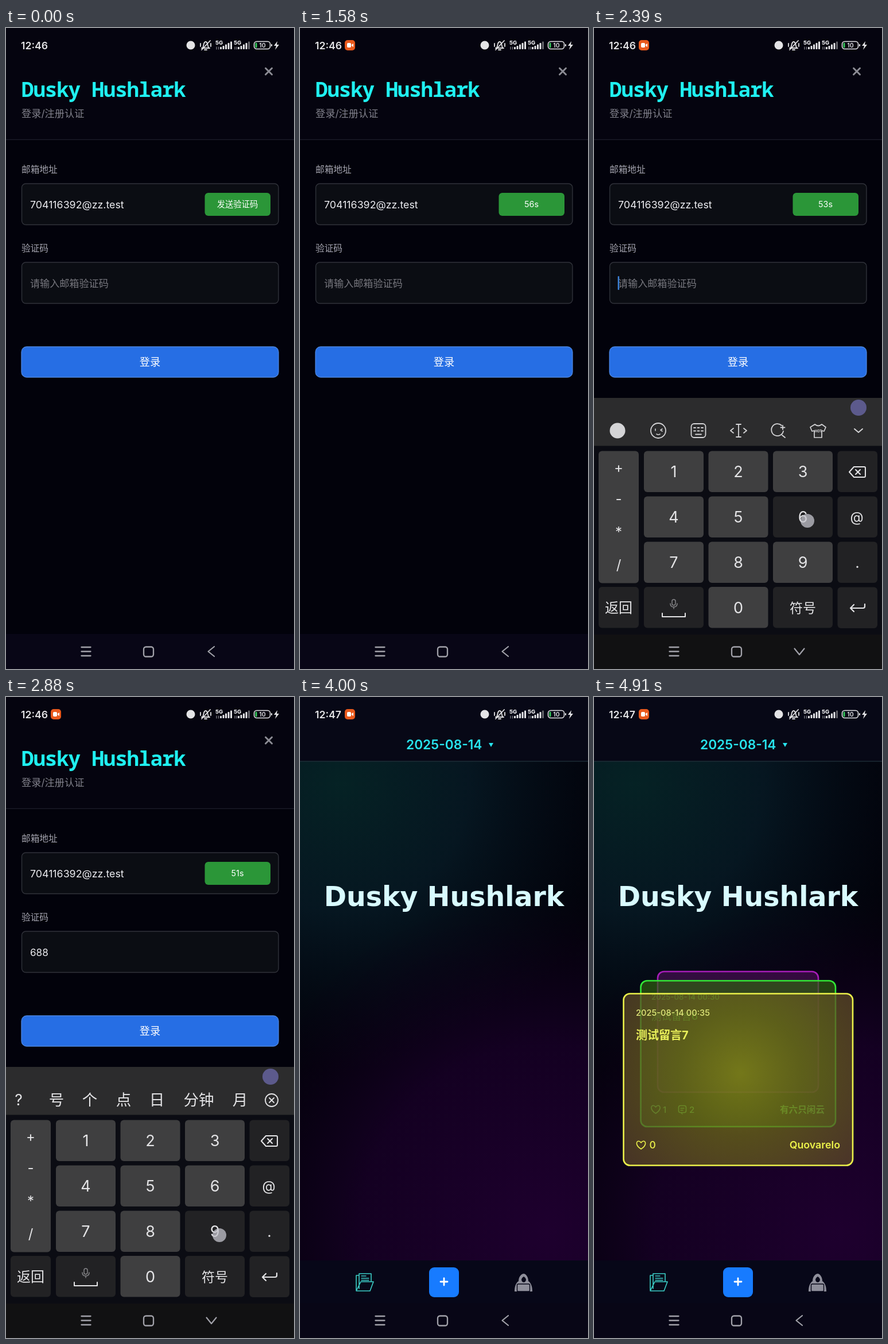
Animation, 502 px wide and 1116 px high, one loop 4.94 s. Source, as an HTML page:

```html
<!DOCTYPE html>
<html lang="zh-CN">
<head>
<meta charset="utf-8">
<title>Login</title>
<style>
html, body { margin: 0; width: 100%; height: 100%; overflow: hidden; background: #02020b; }
svg { display: block; width: 502px; height: 1116px; }
text { font-family: Inter, 'Noto Sans CJK SC', 'Noto Sans CJK', sans-serif; white-space: pre; }
</style>
</head>
<body>
<svg id="stage" viewBox="0 0 502 1116" xmlns="http://www.w3.org/2000/svg"></svg>
<script>
const LOOP = 4940;
const CYAN = '#1ff0f0', KEY = '#3f3f40', DARK = '#222224', INK = '#e4e4e6';

// Markup helpers
const rect = (x, y, w, h, r, fill, more = '') =>
  `<rect x="${x}" y="${y}" width="${w}" height="${h}" rx="${r}" fill="${fill}" ${more}/>`;
const text = (x, y, size, str, fill, more = '') =>
  `<text x="${x}" y="${y}" font-size="${size}" fill="${fill}" ${more}>${str}</text>`;
const mid = (x, y, size, str, fill, more = '') => text(x, y, size, str, fill, `text-anchor="middle" ${more}`);
const path = (d, stroke, w = 2, more = '') =>
  `<path d="${d}" fill="none" stroke="${stroke}" stroke-width="${w}" stroke-linecap="round" stroke-linejoin="round" ${more}/>`;
const disc = (x, y, r, fill, more = '') => `<circle cx="${x}" cy="${y}" r="${r}" fill="${fill}" ${more}/>`;
const group = (id, body, more = '') => `<g id="${id}" ${more}>${body}</g>`;
const at = (x, y, body) => `<g transform="translate(${x} ${y})">${body}</g>`;
const w5 = 'font-weight="500"', w6 = 'font-weight="600"';

const bars = (x, full) => [4, 6, 8.5, 11, 13.5].map((h, i) =>
  rect(x + i * 4.5, 37 - h, 3, h, 1, i < full ? INK : '#66666c')).join('');

function statusBar() {
  return text(26, 37, 17.6, '', INK, `id="time" ${w6}`) +
    group('rec', rect(78, 21, 18, 18, 5, '#e9591c') + rect(82, 26, 7, 8, 2, '#fff') +
      '<path d="M90 29l3-2v6l-3-2z" fill="#fff"/>') +
    disc(322, 30, 7.5, INK) +
    path('M341 35h14M343 34c2-3 1-10 5-10s3 7 5 10M346 38h4', INK, 1.8) +
    path('M341 38L356 22M339 27v5M357 27v5', INK, 1.8) +
    text(365, 29, 9.5, '5G', INK, 'font-weight="800"') + bars(373, 5) +
    text(397, 29, 9.5, '5G', INK, 'font-weight="800"') + bars(404, 4) +
    path('M367 33v4M370.5 33v4', '#88888e', 1.2) + path('M399 33v4M402 33v4', '#88888e', 1.2) +
    rect(432.5, 23.5, 28, 13, 4.5, 'none', `stroke="${INK}" stroke-width="1.6"`) +
    rect(434.5, 25.5, 3, 9, 1.5, '#35c759') + rect(462, 28, 2, 4, 1, INK) +
    mid(447, 34, 10.5, '10', INK, w6) +
    `<path d="M473 23l-6 8h4l-2 7 7-9h-4z" fill="${INK}"/>`;
}

function loginPage() {
  const field = y => rect(27.5, y, 447.5, 71.5, 7, '#0b0d13', 'stroke="#30323a" stroke-width="1.4"');
  return rect(0, 0, 502, 1116, 0, '#02020b') + rect(0, 0, 502, 194, 0, '#05040f') +
    rect(0, 193.7, 502, 1.3, 0, '#1d1d29') +
    path('M452.5 70l11 11M463.5 70l-11 11', '#8c8c94', 3) +
    text(27, 120, 36, 'Dusky Hushlark', CYAN,
      `${w6} letter-spacing="-1.2" style="font-family:'Noto Sans Mono',monospace"`) +
    text(27, 155, 17.2, '登录/注册认证', '#82828c') +
    text(27, 252, 15.7, '邮箱地址', '#a4a4ae', w5) + field(271) +
    text(42, 313.5, 17.8, '704116392@zz.test', '#ececf0') +
    rect(346.5, 287, 114.5, 40, 6, '#2b9638') +
    mid(403.5, 312, 14.3, '', '#fff', 'id="send"') +
    text(27, 389, 15.7, '验证码', '#a4a4ae', w5) + field(408) +
    text(42, 450.5, 17.1, '', '#77777e', 'id="code"') +
    rect(41.5, 432, 2.5, 24, 1, '#3c82d8', 'id="caret"') +
    rect(27, 555, 448, 53, 9, '#266ee4', 'stroke="#4d86e0" stroke-width="1.3"') +
    mid(251, 587.5, 18.2, '登录', '#fff', w5);
}

function heart(x, y, color) {
  return at(x, y, path('M0 7C-11 0-8-7-4-6.8-1.5-6.6 0-4 0-4S1.5-6.6 4-6.8C8-7 11 0 0 7Z', color, 1.6));
}

function cards() {
  const green = '#4fd23c', lime = '#62e84c', yellow = '#ecf24a';
  const frame = (x, y, w, h, fill, edge) =>
    rect(x, y, w, h, 11, fill, `stroke="${edge}" stroke-width="2.6"`);
  const back = frame(111, 478, 280, 210, 'rgba(110,20,120,.42)', '#a61cb8');
  const middle = frame(81.5, 494, 339.5, 254, 'rgba(48,98,16,.68)', '#32e836') +
    text(100, 527, 13.4, '2025-08-14 00:30', green, w5) +
    text(100, 562, 17.5, '测试留言6', green, w5) +
    heart(107.5, 718, lime) + text(120, 723.5, 15, '1', lime, w5) +
    rect(147.5, 711.5, 13, 12, 3, 'none', `stroke="${lime}" stroke-width="1.6"`) +
    path('M151 716h6M151 719.5h4M152 724l2 2', lime, 1.3) +
    text(166, 723.5, 15, '2', lime, w5) +
    text(402, 724, 15.6, '有六只闲云', lime, `text-anchor="end" ${w6}`);
  const front = frame(51.5, 516.5, 399.5, 299, 'url(#gold)', yellow) +
    text(73, 554.5, 14.6, '2025-08-14 00:35', '#e0e87a', w5) +
    text(73, 596, 20, '测试留言7', '#eaf05a', 'font-weight="700"') +
    heart(82, 780, yellow) + text(96.5, 786, 17.5, '0', yellow, w5) +
    text(429, 786, 17.8, 'Quovarelo', yellow, `text-anchor="end" ${w6}`);
  return [back, middle, front].map((c, i) => group('card' + i, c)).join('');
}

function homePage() {
  const folder = path('M98 1033V1007h4M103 1030V1004h21v13M98 1034l8-16h22l-6 16z', '#3ccfc8', 1.6) +
    path('M107 1008h8M107 1012h13M107 1015.5h13', '#3ccfc8', 1.3);
  const hood = '<path d="M390 1004c-6 1-9 7-9 13-5 3-7 10-7 18h31c0-8-2-15-7-18 0-6-3-12-8-13z" fill="#8f8f9b"/>' +
    '<path d="M390 1009c-3 2-4 4-4 6 1 3 2 4 4 4s3-1 4-4c0-2-1-4-4-6z" fill="#070718"/>' +
    rect(378.5, 1022, 22, 13, 2, '#8f8f9b', 'stroke="#070718" stroke-width="1.4"');
  return rect(0, 0, 502, 1116, 0, '#02020a') + rect(0, 112, 502, 870, 0, 'url(#teal)') +
    rect(0, 112, 502, 870, 0, 'url(#plum)') +
    rect(0, 0, 502, 112, 0, '#070816') + rect(0, 111.3, 502, 1.3, 0, '#203139') +
    text(185, 91, 22.7, '2025-08-14', '#28e4ee', w6) +
    '<path d="M329 80h8l-4 7z" fill="#28e4ee"/>' +
    mid(251, 363.5, 47.4, 'Dusky Hushlark', '#d8fbff',
      `font-weight="700" style="font-family:'DejaVu Sans',sans-serif"`) +
    cards() +
    rect(0, 981, 502, 75, 0, '#070718') + folder +
    rect(225, 993, 52, 52, 9, '#177bff') + path('M245 1018h12M251 1012v12', '#fff', 2.8) + hood;
}

// Keyboard
const backspace = (x, y) => at(x, y, path('M-14 0l8-9h18q2 0 2 2v14q0 2-2 2h-18zM-3-4l8 8M5-4l-8 8', INK, 2));
const enter = (x, y) => at(x, y, path('M13-6v4q0 3-3 3H-12M-6-5l-6 6 6 6', INK, 2.2));
const mic = (x, y) => at(x, y, rect(-3, -8, 6, 10, 3, 'none', 'stroke="#858588" stroke-width="1.5"') +
  path('M-6-1q0 6 6 6t6-6M0 5v3', '#858588', 1.5));

function toolbar() {
  const c = '#d4d4d6';
  return disc(41, 701, 13.5, c) +
    disc(112, 701, 13, 'none', `stroke="${c}" stroke-width="1.8"`) +
    path('M107 698v3M119 698l-3 2 3 2M109 707q3 2 6 0', c, 1.6) +
    rect(169.5, 689, 25, 24, 5, 'none', `stroke="${c}" stroke-width="1.8"`) +
    path('M174 696h3M180.5 696h3M187 696h3M174 701.5h3M180.5 701.5h3M187 701.5h3M177 707.5h10', c, 1.8) +
    path('M252 690v22M248 690h8M248 712h8M243 697l-5 4 5 4M261 697l5 4-5 4', c, 1.8) +
    path('M327 692a10.5 10.5 0 1 0 3 10M328 709l5 4M329 692v7M325.5 695.5h7', c, 1.8) +
    path('M385 690q6 5 12 0l7 5-3 7-4-1v12h-13v-12l-4 1-3-7z', c, 1.7) +
    mid(391, 704, 5.5, 'HOT', c, 'font-weight="800"') +
    path('M454 698l7 6 7-6', c, 2);
}

function candidates() {
  const words = [['?', 22], ['号', 88], ['个', 146], ['点', 205], ['日', 263], ['分钟', 336], ['月', 408]];
  return words.map(([s, x]) => mid(x, 711, 26.5, s, INK)).join('') +
    disc(463, 702, 11, 'none', `stroke="${INK}" stroke-width="1.8"`) + path('M459 698l8 8M467 698l-8 8', INK, 1.8);
}

function letters() {
  const rows = [[8, 740, 'QWERTYUIOP', '1234567890'], [31, 820, 'ASDFGHJKL', '~@#$%&*()'], [81, 900, 'ZXCVBNM', "'/-_:;、"]];
  const keys = rows.map(([x0, y, caps, hints]) => [...caps].map((c, i) => {
    const x = x0 + i * 49.6;
    return rect(x, y, 41.5, 64, 6, KEY) + mid(x + 20.7, y + 46, 26.5, c, INK) +
      mid(x + 20.7, y + 17, 12, hints[i].replace('&', '&amp;'), '#77777a');
  }).join('')).join('');
  const low = [[8, 66, DARK], [82, 49, DARK], [139, 42, KEY], [189, 124, KEY], [321, 42, KEY], [371, 49, DARK], [428, 66, DARK]];
  return keys + rect(8, 900, 60, 64, 6, DARK) + rect(435, 900, 59, 64, 6, DARK) +
    path('M38 944v-21M29 931l9-9 9 9', INK, 2.2) + backspace(465, 933) +
    low.map(([x, w, f]) => rect(x, 980, w, 64, 6, f)).join('') +
    mid(39, 1021, 24, '123', INK) + mid(107, 1009, 20, '中', INK) + mid(107, 1033, 12, '英', '#a5a5a8') +
    mid(159, 1024, 26, ',', INK) + mid(159, 1004, 12, '!', '#77777a') +
    mic(251, 1008) + path('M227 1022v5h49v-5', INK, 2) +
    disc(341, 1021, 3.5, 'none', `stroke="${INK}" stroke-width="1.8"`) + mid(341, 1004, 12, '?', '#77777a') +
    mid(395, 1020, 22, '符', INK) + enter(461, 1013);
}

const padX = d => d ? [87, 199.5, 312][(d - 1) % 3] : 199.5;
const padY = d => d ? 736.5 + Math.floor((d - 1) / 3) * 79 : 973;

function numbers() {
  let out = rect(8, 736.5, 70, 230, 6, KEY);
  [['+', 774], ['-', 828], ['*', 886], ['/', 943]].forEach(([s, y]) => out += mid(43, y, 24, s, INK));
  for (let d = 0; d < 10; d++)
    out += rect(padX(d), padY(d), 104, 71.5, 6, KEY, `id="pad${d}"`) + mid(padX(d) + 52, padY(d) + 45.5, 27, d, INK);
  for (let i = 0; i < 4; i++) out += rect(424.5, 736.5 + i * 79, 69.5, 71.5, 6, DARK);
  return out + rect(8, 973, 70, 71.5, 6, DARK) + rect(87, 973, 104, 71.5, 6, DARK) + rect(312, 973, 104, 71.5, 6, DARK) +
    backspace(459, 773) + mid(458, 860, 24, '@', INK) + mid(459, 940, 26, '.', INK) + enter(459, 1009) +
    mid(43, 1018, 24, '返回', INK) + mid(364, 1018, 23, '符号', INK) +
    mic(139, 1003) + path('M119 1019v6h40v-6', INK, 2);
}

function keyboard() {
  return rect(0, 644, 502, 84, 0, '#2c2c2d') +
    disc(461, 661, 14, '#5c5a8c') + group('tools', toolbar()) + group('words', candidates()) +
    group('keys', rect(0, 727.5, 502, 389, 0, '#0b0c13') + rect(0, 1056, 502, 60, 0, '#111112') +
      group('abc', letters()) + group('pad', numbers()));
}

function spinner() {
  const n = 30, step = 2 * Math.PI / n, r = 17;
  const pt = a => `${(r * Math.cos(a)).toFixed(2)} ${(r * Math.sin(a)).toFixed(2)}`;
  return Array.from({ length: n }, (_, i) =>
    `<path d="M${pt(i * step)}A${r} ${r} 0 0 1 ${pt((i + 1.08) * step)}" fill="none" stroke="#fff" stroke-width="4.5" opacity="${(0.72 - i * 0.021).toFixed(2)}"/>`).join('');
}

const toastBox = (x, y, w, h) => rect(x, y, w, h, 12, '#4c4c4c', 'fill-opacity=".92"');
const stop = (o, color, a) => `<stop offset="${o}" stop-color="${color}" stop-opacity="${a}"/>`;
const radial = (id, x, y, r, stops) =>
  `<radialGradient id="${id}" gradientUnits="userSpaceOnUse" cx="${x}" cy="${y}" r="${r}">${stops}</radialGradient>`;

const stage = document.getElementById('stage');
stage.innerHTML = '<defs>' +
  radial('teal', 70, 150, 500, stop(0, '#062a2b', .8) + stop(.45, '#071d28', .75) + stop(1, '#04101c', 0)) +
  radial('plum', 430, 930, 590, stop(0, '#1e002e', 1) + stop(.55, '#170026', .85) + stop(1, '#0e0018', 0)) +
  radial('gold', 255, 655, 240, stop(0, '#848418', .8) + stop(.45, '#6c6818', .74) + stop(1, '#5b4728', .76)) +
  '</defs>' +
  group('login', loginPage()) + group('home', homePage()) + statusBar() +
  rect(0, 1055, 502, 61, 0, '#080616') +
  group('board', keyboard()) +
  path('M131.5 1078h16M131.5 1085.5h16M131.5 1093h16', '#a2a2aa', 2.3) +
  rect(240, 1077.5, 17, 17, 4, 'none', 'stroke="#a2a2aa" stroke-width="2.3"') +
  path('M5-8.5L-5.5 0 5 8.5', '#a2a2aa', 2.2, 'id="back"') +
  group('sent', toastBox(167, 518, 168, 79.5) + mid(251, 565, 20.3, '验证码发送成功', '#fff')) +
  group('loading', toastBox(161, 483, 179, 138) + at(251, 532, group('spin', spinner())) +
    mid(251, 588, 19.5, '加载中...', '#fff')) +
  disc(0, 0, 12, '#c4c4cc', 'id="touch" fill-opacity=".75"');

const ui = {};
stage.querySelectorAll('[id]').forEach(el => ui[el.id] = el);
const show = (id, on) => ui[id].setAttribute('display', on ? 'inline' : 'none');
const set = (id, name, value) => ui[id].setAttribute(name, value);
const between = (t, a, b) => t >= a && t < b;

// Linear interpolation through [time, value] steps
function track(t, steps) {
  if (t <= steps[0][0]) return steps[0][1];
  for (let i = 1; i < steps.length; i++) {
    const [t0, v0] = steps[i - 1], [t1, v1] = steps[i];
    if (t < t1) return v0 + (v1 - v0) * (t - t0) / (t1 - t0);
  }
  return steps[steps.length - 1][1];
}

const PIN = [6, 8, 8, 9, 7, 6];
const TYPED = [2430, 2560, 2680, 2910, 3060, 3200];
const HOLD = 60;
const TAPS = [[90, 404, 310], [1930, 250, 446], [2190, 42, 1014], [3250, 255, 584]]
  .concat(PIN.map((d, i) => [TYPED[i] - HOLD, padX(d) + 60, padY(d) + 42.5]));
const OPEN = 2000, CLOSE = 3300, HOME = 3960;

function draw(t) {
  const home = t >= HOME;
  show('login', !home);
  show('home', home);
  show('rec', t >= 120);
  ui.time.textContent = home ? '12:47' : '12:46';

  const counting = t >= 170;
  ui.send.textContent = counting ? 60 - Math.floor((t - 170) / 300) + 's' : '发送验证码';
  const pin = PIN.filter((_, i) => t >= TYPED[i]).join('');
  ui.code.textContent = pin || '请输入邮箱验证码';
  set('code', 'fill', pin ? '#ececf0' : '#77777e');
  show('caret', between(t, OPEN, CLOSE) && Math.floor((t - OPEN) / 150) % 2 === 0);
  set('caret', 'x', 41.5 + pin.length * 10.6);

  const rise = Math.min(1, Math.max(0, (t - OPEN) / 110));
  const drop = track(t, [[CLOSE, 0], [3330, 125], [3360, 295], [3390, 420], [3420, 472]]);
  show('board', between(t, OPEN, 3420));
  set('board', 'transform', `translate(0 ${472 * (1 - rise) ** 3 + drop})`);
  set('board', 'opacity', track(t, [[CLOSE, 1], [3330, .6], [3360, .2], [3410, 0]]));
  show('keys', t < 3330);
  show('abc', t < 2250);
  show('pad', t >= 2250);
  const words = between(t, TYPED[0], CLOSE);
  show('words', words);
  show('tools', !words);
  PIN.forEach(d => set('pad' + d, 'fill', KEY));
  PIN.forEach((d, i) => between(t, TYPED[i] - HOLD, TYPED[i] + 20) && set('pad' + d, 'fill', DARK));
  const turn = track(t, [[OPEN, 0], [2040, -90], [CLOSE, -90], [3360, -36], [3410, 0]]);
  set('back', 'transform', `translate(358 1085.5) rotate(${turn})`);

  set('sent', 'opacity', track(t, [[180, 0], [230, 1], [1090, 1], [1140, 0]]));
  set('loading', 'opacity', track(t, [[3310, 0], [3345, 1], [3860, 1], [3900, 0]]));
  set('spin', 'transform', `rotate(${78 + (t - 3360) * 1.2})`);

  const tap = TAPS.find(([start]) => between(t, start, start + HOLD));
  show('touch', !!tap);
  if (tap) set('touch', 'transform', `translate(${tap[1]} ${tap[2]})`);

  for (let i = 0; i < 3; i++) {
    const p = track(t, [[4470 + i * 50, 0], [4620 + i * 50, 1]]);
    const s = .85 + .15 * (1 - (1 - p) ** 2);
    set('card' + i, 'opacity', p);
    set('card' + i, 'transform', `translate(251 650) scale(${s}) translate(-251 -650)`);
  }
}

const start = performance.now();
function tick() {
  draw((performance.now() - start) % LOOP);
  requestAnimationFrame(tick);
}
tick();
</script>
</body>
</html>
```
